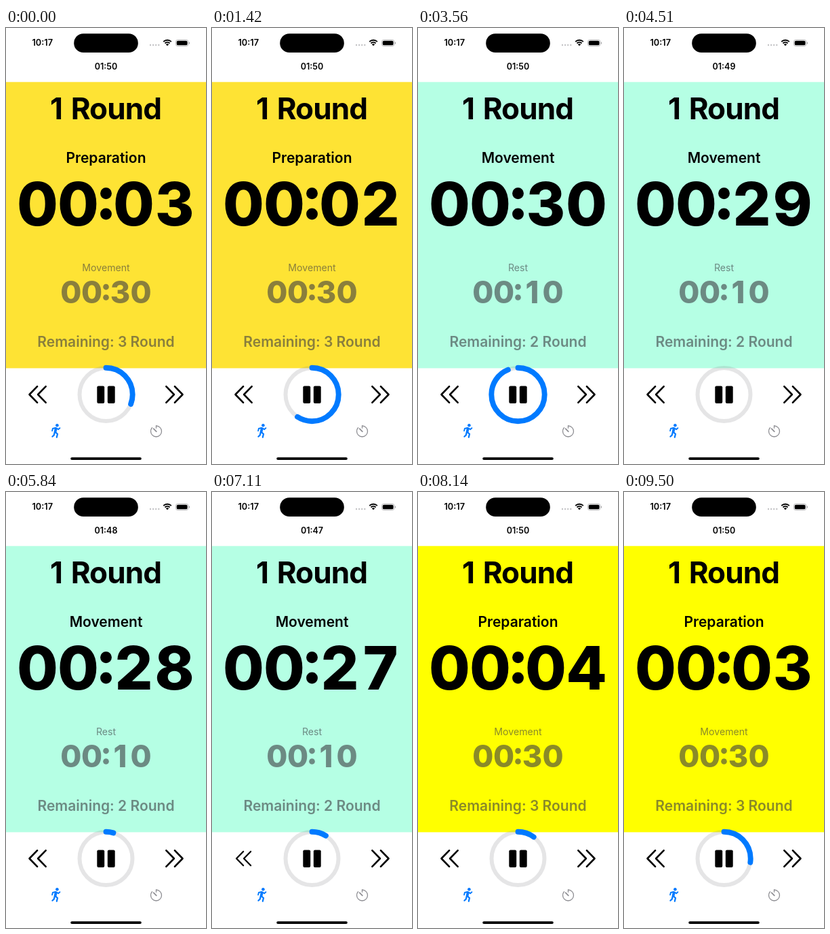
Write an HTML page with a canvas that moves like this. It is 295x640 px and loops after 9600 ms.

```html
<!DOCTYPE html>
<html lang="en">
<head>
<meta charset="utf-8">
<title>Interval timer</title>
<style>
html, body { margin: 0; width: 100%; height: 100%; overflow: hidden; background: #fff; }
canvas { display: block; width: 295px; height: 640px; }
</style>
</head>
<body>
<canvas id="stage"></canvas>
<script>
const W = 295, H = 640, LOOP = 9600, CX = 147.5;
const BLUE = '#007aff', DIM = 'rgba(60,60,67,0.6)', GRAY = '#8e8e93';
const canvas = document.getElementById('stage');
const ctx = canvas.getContext('2d');
const ratio = window.devicePixelRatio || 1;
canvas.width = W * ratio;
canvas.height = H * ratio;

const clamp = x => Math.max(0, Math.min(1, x));
const mix = (a, b, k) => a + (b - a) * clamp(k);
const smooth = x => { const k = clamp(x); return k * k * (3 - 2 * k); };
const twoDigits = n => String(n).padStart(2, '0');

const PREP = { name: 'Preparation', next: 'Movement', nextTime: 30, rounds: 3 };
const MOVE = { name: 'Movement', next: 'Rest', nextTime: 10, rounds: 2, color: '#b5ffe4' };

// Each tick starts a one-second linear ring move to its new value.
function timerState(t) {
  if (t < 3500) {
    const s = Math.floor((t + 540) / 1000);
    const left = Math.max(0, 3 - s);
    const ring = Math.min(1, 0.2 + (t + 540) / 5000);
    return { ...PREP, color: '#fee334', left, ring, total: 50 };
  }
  if (t < 7200) {
    const s = Math.floor((t - 3500) / 1000);
    const ring = s === 0 ? 1 - (t - 3500) / 1000 : (t - 4500) / 30000;
    return { ...MOVE, left: 30 - s, ring, total: 50 - s };
  }
  const s = Math.floor((t - 7135) / 1000);
  const ring = t < 8135 ? Math.min(0.1, (t - 4500) / 30000)
    : t < 9135 ? mix(0.1, 0.2, (t - 8135) / 1000)
    : mix(0.2, 0.4, (t - 9135) / 1000);
  return { ...PREP, color: '#ffff00', left: 5 - s, ring, total: 50 };
}

function text(str, x, y, size, weight, color = '#000', tracking = 0, wordGap = 0) {
  ctx.font = `${weight} ${size}px Inter, sans-serif`;
  ctx.letterSpacing = tracking + 'px';
  ctx.wordSpacing = wordGap + 'px';
  ctx.textAlign = 'center';
  ctx.fillStyle = color;
  ctx.fillText(str, x + tracking / 2, y);
}

function disc(x, y, r, color) {
  ctx.fillStyle = color;
  ctx.beginPath();
  ctx.arc(x, y, r, 0, Math.PI * 2);
  ctx.fill();
}

function pill(x, y, w, h, r, color) {
  ctx.fillStyle = color;
  ctx.beginPath();
  ctx.roundRect(x, y, w, h, r);
  ctx.fill();
}

function line(points, width, color) {
  ctx.lineWidth = width;
  ctx.strokeStyle = color;
  ctx.lineCap = ctx.lineJoin = 'round';
  ctx.beginPath();
  points.forEach(([x, y]) => ctx.lineTo(x, y));
  ctx.stroke();
}

function arc(x, y, r, from, to, width, color, cap = 'round') {
  ctx.lineWidth = width;
  ctx.strokeStyle = color;
  ctx.lineCap = cap;
  ctx.beginPath();
  ctx.arc(x, y, r, from, to);
  ctx.stroke();
}

// Fixed-width digits around a round, vertically centred colon.
function clock(seconds, y, size, color) {
  const pitch = size * 0.682, inner = size * 0.466;
  const offsets = [-inner - pitch, -inner, inner, inner + pitch];
  [...'00' + twoDigits(seconds)].forEach((d, i) => text(d, CX + offsets[i], y, size, 800, color));
  const mid = y - size * 0.36;
  disc(CX, mid - size * 0.172, size * 0.096, color);
  disc(CX, mid + size * 0.172, size * 0.096, color);
}

function statusBar() {
  text('10:17', 53.7, 26.3, 12.75, 600);
  pill(100.2, 8.3, 94.6, 27.8, 13.9, '#000');
  for (let i = 0; i < 4; i++) disc(213 + i * 4.1, 25, 1.2, '#c4c4c6');
  const up = -Math.PI / 2, spread = Math.PI / 4;
  [8.2, 5].forEach(r => arc(238, 26, r, up - spread, up + spread, 1.9, '#000', 'butt'));
  ctx.fillStyle = '#000';
  ctx.beginPath();
  ctx.moveTo(238, 26.3);
  ctx.arc(238, 26.3, 3, up - spread, up + spread);
  ctx.fill();
  ctx.lineWidth = 0.8;
  ctx.strokeStyle = '#a5a5a7';
  ctx.beginPath();
  ctx.roundRect(250.4, 17.4, 18.4, 9.2, 3);
  ctx.stroke();
  pill(251.7, 18.7, 15.8, 6.6, 1.9, '#000');
  pill(269.8, 20.5, 1.2, 3, 0.6, '#a5a5a7');
}

function chevrons(x, dir, scale) {
  ctx.save();
  ctx.translate(x, 538);
  ctx.scale(dir * scale, scale);
  [-12, 0.6].forEach(tip =>
    line([[tip + 11.6, -11.8], [tip, 0], [tip + 11.6, 11.8]], 2.6, '#000'));
  ctx.restore();
}

function runner() {
  disc(75.4, 583.3, 2.3, BLUE);
  line([[73.6, 588], [72.6, 593]], 3.8, BLUE);
  line([[72.8, 587], [68.9, 588], [68.1, 591.4]], 1.9, BLUE);
  line([[74.8, 587.6], [77, 589.3], [79.4, 587.2]], 1.9, BLUE);
  line([[73, 593.4], [76, 596], [74.8, 600.8]], 2.2, BLUE);
  line([[71.6, 594], [70.8, 597.6], [68.4, 599.8]], 2.2, BLUE);
}

function stopwatch() {
  arc(221.5, 592, 8, -Math.PI / 2, Math.PI * 1.23, 1.3, GRAY);
  line([[221.5, 584], [221.5, 587.3]], 1.3, GRAY);
  line([[221.8, 592.3], [217.6, 588.1]], 1.7, GRAY);
}

function controls(ring, t) {
  const press = smooth((t - 6960) / 130) * (1 - smooth((t - 7210) / 350));
  arc(CX, 538, 39, 0, Math.PI * 2, 6, 'rgba(142,142,147,0.23)');
  if (ring > 0.001) {
    const top = -Math.PI / 2;
    arc(CX, 538, 39.2, top, top + ring * Math.PI * 2, 7.9, BLUE);
  }
  pill(134.3, 525.5, 10.9, 25.5, 2, '#000');
  pill(149.8, 525.5, 10.9, 25.5, 2, '#000');
  chevrons(46.5, 1, 1 - 0.13 * press);
  chevrons(248.5, -1, 1);
}

function draw(t) {
  const s = timerState(t);
  ctx.setTransform(ratio, 0, 0, ratio, 0, 0);
  ctx.fillStyle = '#fff';
  ctx.fillRect(0, 0, W, H);
  statusBar();
  text('01:' + s.total, CX, 61.3, 12.5, 600);

  ctx.fillStyle = s.color;
  ctx.fillRect(0, 79.3, W, 420.1);
  text('1 Round', CX, 133.8, 44, 700, '#000', -0.9, 3);
  text(s.name, CX, 198, 21, 600);
  clock(s.left, 289.6, 88, '#000');
  text(s.next, CX, 357, 14.1, 400, DIM);
  clock(s.nextTime, 404, 45, DIM);
  text(`Remaining: ${s.rounds} Round`, CX, 468, 21, 600, DIM);

  controls(s.ring, t);
  runner();
  stopwatch();
  pill(95.2, 630.2, 104.6, 3.8, 1.9, '#000');
}

const start = performance.now();
function frame() {
  draw((performance.now() - start) % LOOP);
  requestAnimationFrame(frame);
}
frame();
</script>
</body>
</html>
```
